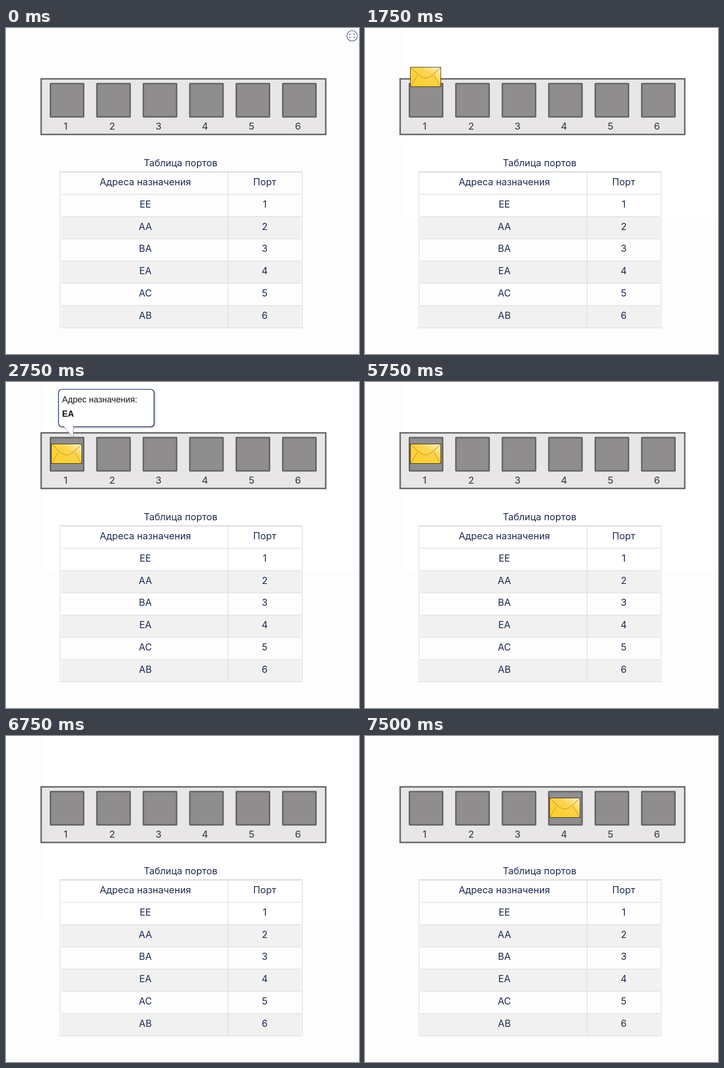
An HTML page that plays this animation: 743x686 px, repeating every 8 s.

```html
<!DOCTYPE html>
<html lang="ru">
<head>
<meta charset="utf-8">
<title>Таблица портов</title>
<style>
  html, body { margin: 0; width: 100%; height: 100%; overflow: hidden; background: #fdfdfd; }
  svg { display: block; width: 743px; height: 686px; }
  text { font: 20px Inter, sans-serif; fill: #1d2c4d; text-anchor: middle; }
  #panel rect { fill: #e8e6e7; stroke: #636262; stroke-width: 3; }
  #panel .port { fill: #8f8d8e; }
  #panel text { font-weight: 500; fill: #4a4849; }
  #grid { fill: none; stroke: #dfdfdf; stroke-width: 1.5; }
  #bubble text { font: 18px "Liberation Sans", Arial, sans-serif; fill: #151515; text-anchor: start; }
  #bubble .value { font-weight: bold; }

  #icon, #glow, #bubble, #mail { animation: 8s step-end infinite; }
  #icon { animation-name: icon; }
  #glow { animation-name: glow; }
  #bubble { animation-name: bubble; }
  #mail { animation-name: mail; }

  @keyframes icon { 0% { opacity: 1 } 6.25%, 100% { opacity: 0 } }
  @keyframes glow { 0% { opacity: 0 } 6.25% { opacity: 1 } 93.75%, 100% { opacity: 0 } }
  @keyframes bubble { 0% { opacity: 0 } 34.375% { opacity: 1 } 71.875%, 100% { opacity: 0 } }
  /* fade in, drop into port 1, fade out, fade in at port 4 */
  @keyframes mail {
    0%      { opacity: 0;   transform: translate(95px, 29px) }
    6.25%   { opacity: .5;  transform: translate(95px, 29px) }
    9.375%  { opacity: 1;   transform: translate(95px, 29px) }
    18.75%  { opacity: 1;   transform: translate(95px, 54px) }
    21.875% { opacity: 1;   transform: translate(95px, 82px) }
    25%     { opacity: 1;   transform: translate(95px, 115px) }
    28.125% { opacity: 1;   transform: translate(95px, 130px) }
    78.125% { opacity: .67; transform: translate(95px, 130px) }
    81.25%  { opacity: .33; transform: translate(95px, 130px) }
    84.375% { opacity: 0;   transform: translate(95px, 130px) }
    87.5%   { opacity: .33; transform: translate(388px, 130px) }
    90.625% { opacity: .67; transform: translate(388px, 130px) }
    93.75%, 100% { opacity: 1; transform: translate(388px, 130px) }
  }
</style>
</head>
<body>
<svg viewBox="0 0 743 686">
  <defs>
    <linearGradient id="gold" x1="0.3" y1="0.75" x2="1" y2="0">
      <stop offset="0" stop-color="#fdcf35"/>
      <stop offset="0.5" stop-color="#fdd54d"/>
      <stop offset="1" stop-color="#fff6d6"/>
    </linearGradient>
    <filter id="shadow" x="-10%" y="-10%" width="120%" height="130%">
      <feDropShadow dx="2" dy="2" stdDeviation="1.5" flood-color="#000" flood-opacity="0.3"/>
    </filter>
  </defs>

  <rect id="glow" x="79" width="664" height="400" fill="#fff"/>

  <g id="icon" fill="none" stroke="#43577a" stroke-width="1.2">
    <circle cx="728.5" cy="16.5" r="11"/>
    <path d="M723.5 15v-2.5h3M730.5 12.5h3v2.5M733.5 17.5v2.5h-3M726.5 20h-3v-2.5"/>
  </g>

  <g id="panel"><rect x="74" y="107" width="599" height="117"/></g>

  <text x="367.5" y="291">Таблица портов</text>
  <g id="table"></g>
  <path id="grid"/>

  <g id="mail">
    <rect x="0.5" y="0.5" width="64" height="41" fill="url(#gold)" stroke="#2b2205"/>
    <path d="M1 1.5L20 18.5Q32.5 28.5 45 18.5L64 1.5M1.5 40.5L15 18M63.5 40.5L50 18"
          fill="none" stroke="#cf9c2b" stroke-width="1.3"/>
  </g>

  <g id="bubble">
    <g filter="url(#shadow)">
      <rect x="110.5" y="15.5" width="201" height="78.5" rx="7" fill="#fff" stroke="#2a4067" stroke-width="1.7"/>
    </g>
    <path d="M122 93L141.500 117V93" fill="#fff"/>
    <path d="M122 95L141.500 117V95" fill="none" stroke="#8b8f97"/>
    <text x="118" y="43">Адрес назначения:</text>
    <text class="value" x="118" y="73">ЕА</text>
  </g>
</svg>
<script>
  const byId = id => document.getElementById(id);

  function add(parent, tag, attrs, label = '') {
    const el = document.createElementNS('http://www.w3.org/2000/svg', tag);
    for (const key in attrs) el.setAttribute(key, attrs[key]);
    el.textContent = label;
    parent.append(el);
  }

  const panel = byId('panel');
  for (let i = 0; i < 6; i++) {
    const x = 93.5 + 97.8 * i;
    add(panel, 'rect', { class: 'port', x, y: 117, width: 70, height: 70, rx: 0.5 });
    add(panel, 'text', { x: x + 32, y: 214 }, i + 1);
  }

  const table = byId('table');
  const rows = ['Адреса назначения', 'ЕЕ', 'АА', 'ВА', 'ЕА', 'АС', 'АВ'];
  const rowTop = i => 303.2 + 46.83 * i;
  let lines = 'M113.500 302H623.500V631H113.500ZM467.500 303V631M115 303.500H622';

  rows.forEach((name, i) => {
    const y = rowTop(i);
    if (i) lines += `M117 ${y}H621`;
    if (i && i % 2 === 0) {
      add(table, 'rect', { x: 116, y, width: 505, height: 46.8, fill: '#f1f1f1' });
    }
    const base = Math.round(y + 27.8);
    add(table, 'text', { x: 293.3, y: base }, name);
    add(table, 'text', { x: 544.5, y: base }, i || 'Порт');
  });
  byId('grid').setAttribute('d', lines);
</script>
</body>
</html>
```
